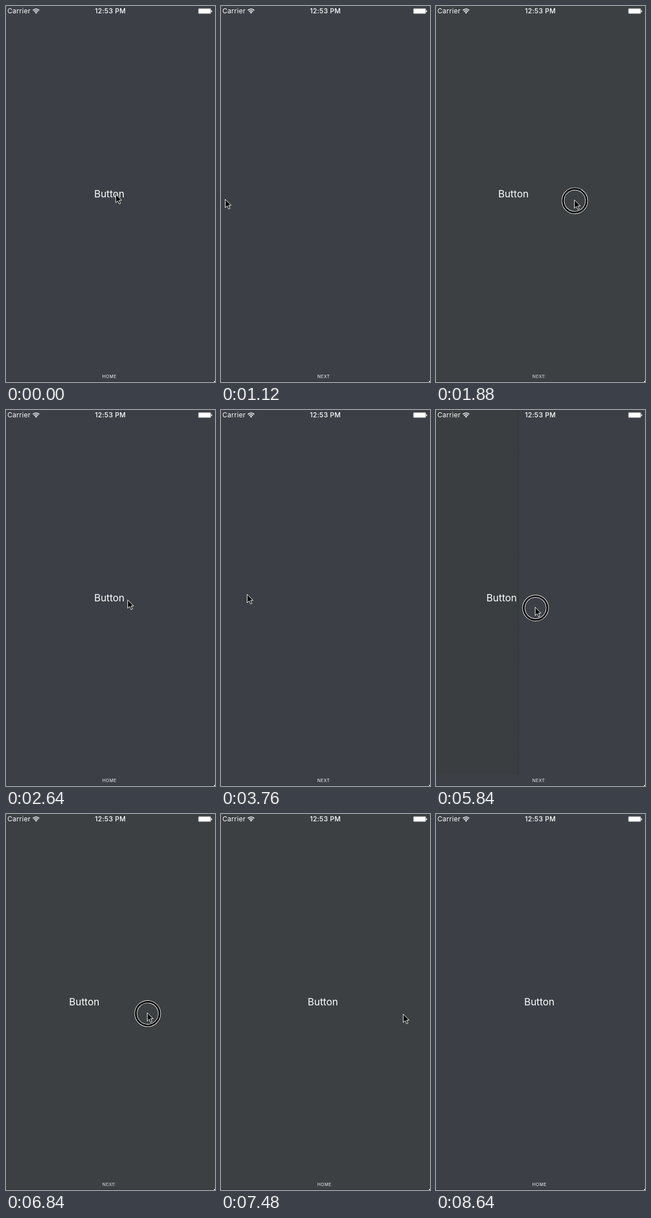
These frames come from a looping animation (372 px wide and 666 px high, 9160 ms). An HTML page:

```html
<!DOCTYPE html>
<html lang="en">
<head>
<meta charset="utf-8">
<title>Swipe back</title>
<style>
  html, body { margin: 0; width: 100%; height: 100%; overflow: hidden; background: #3c4046; }
  svg { display: block; width: 372px; height: 666px; }
  text { font-family: Inter, Roboto, sans-serif; fill: #fff; }
  .status { font-size: 12px; letter-spacing: .3px; }
  .clock { font-weight: 500; }
  .button { font-size: 17.5px; }
  .title { font-size: 7.5px; letter-spacing: .7px; }
</style>
</head>
<body>
<svg viewBox="0 0 372 666">
  <defs>
    <clipPath id="cut"><rect id="cutBox" width="372" height="646"/></clipPath>
    <linearGradient id="fade">
      <stop offset="0" stop-color="#000" stop-opacity="0"/>
      <stop offset="1" stop-color="#000"/>
    </linearGradient>
  </defs>

  <rect id="back" width="372" height="666"/>

  <g clip-path="url(#cut)">
    <rect id="under" width="372" height="646"/>
    <text id="button" class="button" x="157" y="339">Button</text>
  </g>
  <rect id="shadow" width="7" height="646" fill="url(#fade)"/>

  <text id="home" class="title" x="171.5" y="658.5">HOME</text>
  <text id="next" class="title" x="171.5" y="658.5">NEXT</text>
  <rect y="664.5" width="372" height="1.5" opacity=".12"/>
  <path d="M372 663.5v2.5h-2.5z" fill="#fff"/>

  <text class="status" x="2.5" y="13.4">Carrier</text>
  <g fill="none" stroke="#fff" stroke-width="1.6">
    <path d="M47.8 7.6a8 8 0 0 1 11.4 0"/>
    <path d="M49.9 9.9a5 5 0 0 1 7.2 0"/>
  </g>
  <path d="M53.5 13.6l-2-2.1a2.9 2.9 0 0 1 4 0z" fill="#fff"/>
  <text class="status clock" x="158.2" y="13.4">12:53 PM</text>
  <g fill="#fff">
    <rect x="342.4" y="4.4" width="22.2" height="9.2" rx="1.5" fill="none" stroke="#fff" stroke-width=".8" opacity=".6"/>
    <rect x="343" y="5" width="21" height="8" rx=".8"/>
    <path d="M365.2 7.2q1.8.4 1.8 2t-1.8 2z"/>
  </g>

  <g id="pointer">
    <g id="ring" fill="none" transform="translate(1 2)">
      <circle r="21" stroke="#fff" stroke-width="5"/>
      <circle r="21" stroke="#000" stroke-width="3.2"/>
    </g>
    <path d="M.3.5V15.3L3.8 12l2.5 5.6 2.5-1.1L6.4 11.1h4.5z" stroke="#fff"/>
  </g>
</svg>

<script>
const LOOP = 9160, STEP = 40, W = 372;
const TAP = 80, TRAVEL = 840, SLIDE = 400;  // ms
const PARALLAX = 0.3, LAG = 28, BOW = 20;
const BASE = [60, 64, 70], MID = [60, 64, 67], DIM = [53, 57, 57];
const START = [195, 333];

// Each round: tap the button, go to the left edge, drag right, let go
const rounds = [
  { tap: 240, grab: 1360, drop: 2080, rest: 2960, grip: [7, 342], far: [266, 343], exit: START, power: 2 },
  { tap: 3280, grab: 4480, drop: 7240, rest: 7720, grip: [-1, 342], far: [262, 352], exit: [386, 356], power: 1.65 }
];
const [first, last] = rounds;

const $ = id => document.getElementById(id);
const set = (id, attrs) => {
  for (const key in attrs) $(id).setAttribute(key, attrs[key]);
};
const rgb = c => `rgb(${c.map(Math.round)})`;
const show = on => on ? "visible" : "hidden";

const mix = (a, b, k) => a.map((v, i) => v + (b[i] - v) * k);
const part = (t, from, to) => Math.min(1, Math.max(0, (t - from) / (to - from)));
const smooth = k => k * k * (3 - 2 * k);
const out = (k, power = 3) => 1 - (1 - k) ** power;

function cursorAt(t, r) {
  const leave = r.tap + TAP;
  const k = out(part(t, leave, leave + TRAVEL), 2.2);
  let p = mix(START, r.grip, k);
  p[1] -= BOW * Math.sin(Math.PI * k);
  p = mix(p, r.far, out(part(t, r.grab, r.drop), r.power));
  return mix(p, r.exit, smooth(part(t, r.drop, r.rest)));
}

// Left edge of the upper page
function edgeAt(t, r, cursorX) {
  const leave = r.tap + TAP;
  if (t < r.grab) return W * (1 - out(part(t, leave, leave + SLIDE)));
  if (t < r.drop) return Math.max(0, cursorX - LAG);
  const held = r.far[0] - LAG;
  return held + (W - held) * out(part(t, r.drop, r.drop + SLIDE));
}

function draw(t) {
  const r = t < first.rest ? first : last;
  const [x, y] = cursorAt(t, r);
  const edge = edgeAt(t, r, x), p = edge / W;
  const moving = p > 0 && p < 1;

  set("back", { fill: rgb(moving && p > 0.5 ? MID : BASE) });
  set("under", { fill: rgb(p < 1 ? mix(DIM, MID, Math.min(1, p / 0.55)) : BASE) });
  set("cutBox", { width: edge });
  set("button", { transform: `translate(${-PARALLAX * W * (1 - p)} 0)` });
  set("shadow", { x: edge - 7, opacity: moving ? 0.2 * Math.max(0, 1 - p / 0.6) : 0 });

  const blend = p ** 2.5;
  set("home", { opacity: blend });
  set("next", { opacity: 1 - blend });

  const visible = t < last.rest;
  const tapping = t >= r.tap && t < r.tap + TAP;
  const dragging = t >= r.grab && t < r.drop;
  set("pointer", { transform: `translate(${x} ${y})`, visibility: show(visible) });
  set("ring", { visibility: show(tapping || dragging) });
}

const start = performance.now();
function tick() {
  const t = (performance.now() - start) % LOOP;
  draw(Math.floor(t / STEP) * STEP);
  requestAnimationFrame(tick);
}
tick();
</script>
</body>
</html>
```
